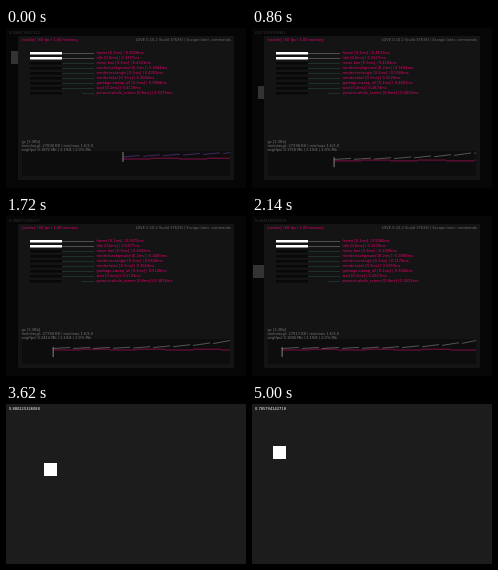
Recreate the animation shown at these times as an HTML page with a canvas. Size 240 by 160 pixels, loop 5.02 s.

```html
<!DOCTYPE html>
<html lang="en">
<head>
<meta charset="utf-8">
<title>Profiler overlay</title>
<style>
  html, body { margin: 0; width: 100%; height: 100%; overflow: hidden; background: #1c1c1c; }
  canvas { display: block; width: 240px; height: 160px; }
</style>
</head>
<body>
<canvas id="stage" width="240" height="160"></canvas>
<script>
const ctx = document.getElementById('stage').getContext('2d');
const LOOP = 5020, STEP = 20, CLOSE = 2.4;
const PINK = '#e6006e';

// Box path: time in seconds, left, top
const PATH = [
  [0, 5, 23], [0.26, 8, 34], [0.52, 5, 45], [0.8, 5, 56], [1.18, 10, 67],
  [1.72, 18, 62], [2.16, 0, 48], [2.64, -3, 31], [3.24, 20, 44],
  [3.62, 38, 59], [3.8, 45, 59], [4.06, 49, 49], [4.34, 45, 36],
  [4.6, 36, 29], [5, 21, 42]
];
const ROWS = ['frame', 'idle', 'move box', 'render.background', 'render.rectangle',
  'render.label', 'garbage.sweep_all', 'wait', 'present.whole_screen'];

function noise(n) {
  const v = Math.sin(n * 12.9898 + 4.1414) * 43758.5453;
  return v - Math.floor(v);
}

// Smooth curve through the points, with slopes from the neighbours
function follow(points, t, k) {
  const last = points.length - 1;
  let i = 0;
  while (i < last - 1 && points[i + 1][0] < t) i++;
  const slope = j => {
    const a = points[Math.max(0, j - 1)], b = points[Math.min(last, j + 1)];
    return (b[k] - a[k]) / (b[0] - a[0]);
  };
  const a = points[i], b = points[i + 1], d = b[0] - a[0];
  const u = Math.min(1, (t - a[0]) / d), u2 = u * u, u3 = u2 * u;
  return (2 * u3 - 3 * u2 + 1) * a[k] + (u3 - 2 * u2 + u) * d * slope(i) +
    (3 * u2 - 2 * u3) * b[k] + (u3 - u2) * d * slope(i + 1);
}

function rect(x, y, w, h, color) {
  ctx.fillStyle = color;
  ctx.fillRect(x, y, w, h);
}

function text(s, x, y, color, align = 'left') {
  ctx.save();
  ctx.translate(x, y);
  ctx.scale(0.3, 0.3);
  ctx.font = '12px "DejaVu Sans", sans-serif';
  ctx.textAlign = align;
  ctx.textBaseline = 'alphabetic';
  ctx.fillStyle = color;
  ctx.fillText(s, 0, 0);
  ctx.restore();
}

function line(points, color, width = 0.6) {
  ctx.beginPath();
  points.forEach(([x, y]) => ctx.lineTo(x, y));
  ctx.strokeStyle = color;
  ctx.lineWidth = width;
  ctx.stroke();
}

function drawBox(t, tick) {
  rect(0, 0, 240, 160, '#1c1c1c');
  rect(Math.round(follow(PATH, t, 1)), Math.round(follow(PATH, t, 2)), 13, 13, '#fff');
  let digits = '';
  for (let i = 0; i < 12; i++) digits += Math.floor(noise(tick * 13 + i) * 10);
  text('0.' + digits, 3, 6.2, '#fff');
}

function drawRows(tick) {
  ROWS.forEach((name, i) => {
    const y = 25 + i * 5;
    const bright = i < 2;
    const ms = (0.3 + noise(tick + i * 31) * 0.3).toFixed(4);
    const part = (noise(i + 7) * 0.8).toFixed(1);
    rect(24, y - 1, 32, 2.5, bright ? '#fff' : '#080808');
    line([[i === 8 ? 76 : 56, y + 0.5], [88, y + 0.5]], bright ? '#777' : '#24443a');
    text(`${name} [${part}ms] | ${ms}ms`, 90.5, y + 1.4, PINK);
  });
}

// Level line made of short rising pieces with gaps where it falls back
function drawMemory(x0, span, t) {
  const base = Math.min(132, 128.5 + 2.8 * t), rise = base - 125;
  const color = t < 0.25 ? '#63389c' : t < 0.85 ? '#39775a' : '#858585';
  const level = s => base - rise * Math.pow(s / span, 1 + 1.5 * t);
  for (let s = 0; s < span; s += 20) {
    const end = Math.min(s + 17, span);
    line([[x0 + s, level(s) + 0.5], [x0 + end, level(end) - 0.5]], color);
  }
}

function drawGraph(t) {
  const x0 = 117 - 40.6 * t, span = 224 - x0;
  const y = Math.min(134, 131 + 2.2 * t);
  ctx.save();
  ctx.beginPath();
  ctx.rect(16, 122, 208, 26);
  ctx.clip();
  for (let s = 0; s < span; s += 56) {
    line([[x0 + s, y], [x0 + s + 28, y]], '#b0105e', 0.7);
    line([[x0 + s + 28, y - 0.8], [x0 + s + 56, y - 0.8]], '#b0105e', 0.7);
  }
  drawMemory(x0, span, t);
  const top = Math.min(131, 124 + 6 * t);
  line([[x0, top], [x0, top + 10]], '#b5b5b5', 0.7);
  ctx.restore();
}

function drawPanel(t, tick) {
  rect(0, 0, 240, 160, 'rgba(0,0,0,0.8)');
  rect(12, 8, 216, 144, '#141414');
  rect(16, 123, 208, 25, '#0d0d0d');
  text('[stable] | 60 fps / 1.00 memory', 15.5, 13, PINK);
  text('LOVE 0.10.2 (build 37636) | Escape later, commands', 225, 13, '#6c6c6c', 'right');
  drawRows(tick);
  const kb = Math.floor(27000 + t * 400 + noise(tick) * 90);
  text('gc [3.3Kb]', 15.5, 115, '#777');
  text(`mem(avg): ${kb} KB / min/max 1.6/3.0`, 15.5, 118.8, '#777');
  text(`avg(fps) 0.${Math.floor(1000 + noise(tick + 5) * 900)} Mb | 2.19/4 | 2.0% Mb`, 15.5, 122.6, '#777');
  drawGraph(t);
}

const start = performance.now();
function draw(now) {
  const tick = Math.floor((Math.max(0, now - start) % LOOP) / STEP);
  const t = tick * STEP / 1000;
  drawBox(t, tick);
  if (t < CLOSE) drawPanel(t, tick);
  requestAnimationFrame(draw);
}
draw(start);
</script>
</body>
</html>
```
